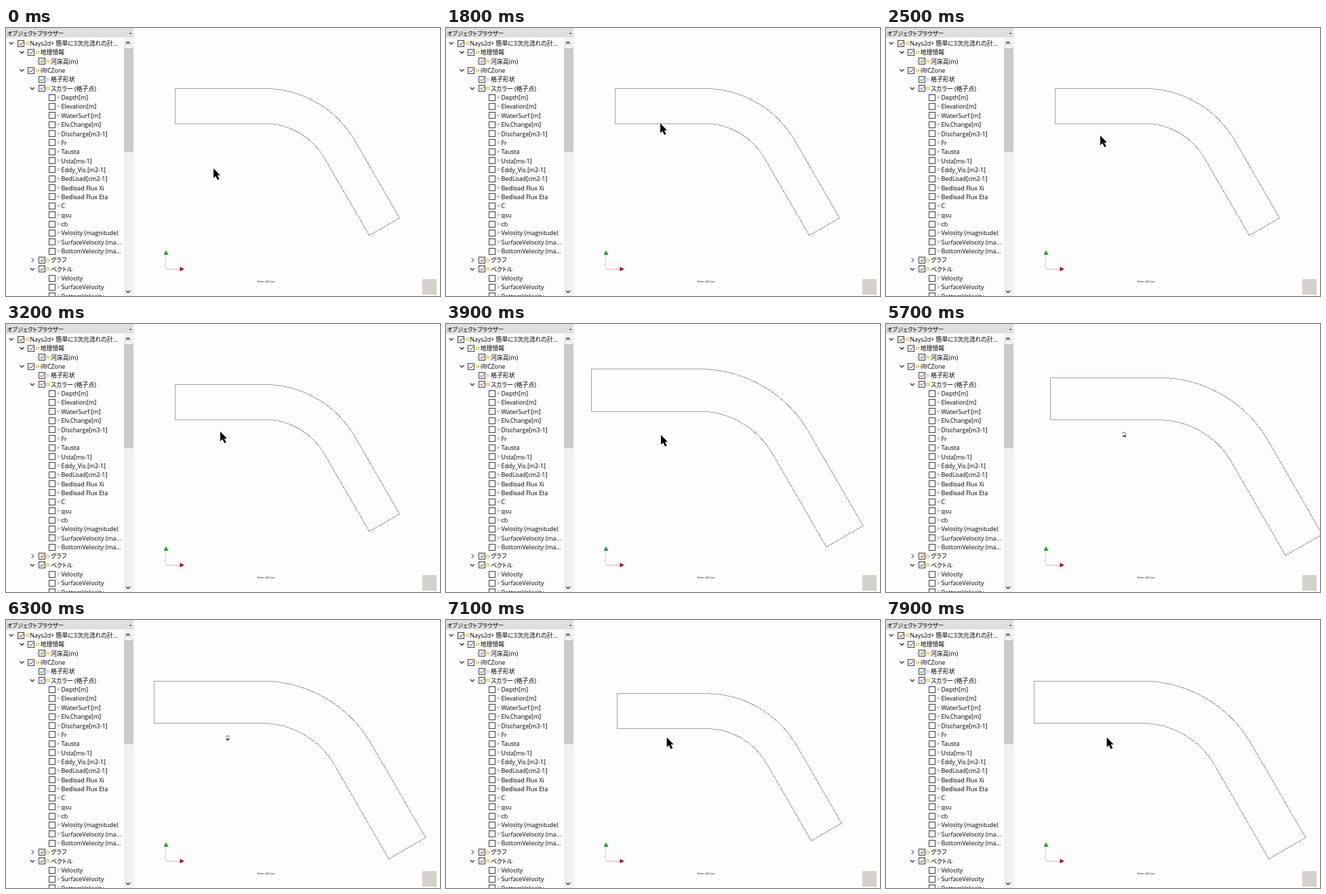
Animation, 640 px wide and 396 px high, one loop 8000 ms. Source, as an HTML page:

```html
<!DOCTYPE html>
<html lang="ja">
<head>
<meta charset="utf-8">
<title>Object browser and view</title>
<style>
  html, body { margin: 0; width: 100%; height: 100%; overflow: hidden; background: #fdfdfe; }
  svg { display: block; width: 640px; height: 396px; }
  text { font: 8.9px "Open Sans", "Noto Sans CJK JP", "Noto Sans CJK", sans-serif; font-feature-settings: "palt"; fill: #000; }
  .line { fill: none; stroke: #404040; stroke-width: 1; }
  .chevron { stroke-width: 1.5; }
</style>
</head>
<body>
<svg viewBox="0 0 640 396">
  <defs><clipPath id="viewport"><rect x="190" width="450" height="396"/></clipPath></defs>
  <rect width="640" height="396" fill="#fdfdfe"/>

  <rect width="188" height="14" fill="#dedede"/>
  <text x="1.5" y="10.6" style="font-size:8.5px">オブジェクトブラウザー</text>
  <rect x="182.5" y="7" width="2" height="2" fill="#404040"/>
  <g id="tree"></g>
  <rect x="174" y="15" width="14" height="381" fill="#f0f0f0"/>
  <rect x="174" y="30" width="14" height="153" fill="#cacaca"/>
  <path class="line chevron" d="M177 23.5l3-3 3 3M177 388l3 3 3-3"/>
  <path d="M189.5 0V396" stroke="#f0f0ea" fill="none"/>

  <g clip-path="url(#viewport)"><path id="channel" fill="none" stroke="#a3a3a0" shape-rendering="crispEdges"/></g>

  <path d="M235.5 356V335" stroke="#a4f0a0"/>
  <path d="M236 356.5H257" stroke="#ffa6b8"/>
  <path d="M236 328.5l3.3 6.5h-6.6z" fill="#08a808"/>
  <path d="M263 356.3l-6.5 3.3v-6.6z" fill="#b80024"/>
  <text x="370" y="376" style="font-size:4.2px">Time: 325 sec</text>
  <rect x="614" y="371" width="21" height="23" fill="#d2d2ca"/>

  <path id="arrow" d="M0 0V14.2L3.2 11.3 6 17 8.6 15.8 5.8 10.2H10z" fill="#000"/>
  <g id="grab">
    <path d="M-2-.5V-2.5Q0-4 2-2.5V1" fill="none" stroke="#70708c"/>
    <path d="M-2 2.5H2.5" stroke="#18185c" stroke-width="2"/>
  </g>
</svg>
<script>
const $ = id => document.getElementById(id);
const LOOP = 8000, STEP = 100;
const CENTER = { x: 415.5, y: 198 };

// Tree rows: indent level, label, kind ("v" open, ">" closed, "f" folder, "l" checked leaf, "" leaf)
const rows = [
  [0, "Nays2d+ 簡単に3次元流れの計...", "v"], [1, "地理情報", "v"], [2, "河床高(m)", "f"],
  [1, "iRICZone", "v"], [2, "格子形状", "l"], [2, "スカラー (格子点)", "v"],
  ...["Depth[m]", "Elevation[m]", "WaterSurf.[m]", "Elv.Change[m]", "Discharge[m3-1]", "Fr",
    "Tausta", "Usta[ms-1]", "Eddy_Vis.[m2-1]", "BedLoad[cm2-1]", "Bedload Flux Xi",
    "Bedload Flux Eta", "C", "qsu", "cb", "Velocity (magnitude)", "SurfaceVelocity (ma...",
    "BottomVelocity (ma..."].map(label => [3, label, ""]),
  [2, "グラフ", ">"], [2, "ベクトル", "v"],
  ...["Velocity", "SurfaceVelocity", "BottomVelocity"].map(label => [3, label, ""])
];

function rowMarkup([level, label, kind], i) {
  const x = 17 + 15.4 * level, y = 22.5 + 13.35 * i;
  const boxX = Math.round(x) + .5, boxY = Math.round(y - 5) + .5;
  const chevron = { v: `M${x - 12} ${y - 1.5}l3 3 3-3`, ">": `M${x - 10} ${y - 3}l3 3-3 3` }[kind];
  const leaf = kind === "" || kind === "l";
  return `<rect class="line" x="${boxX}" y="${boxY}" width="9" height="9"/>` +
    (kind ? `<path class="line" d="M${boxX + 2} ${boxY + 4.5}l2 2.2 3.8-4.5"/>` : "") +
    (chevron ? `<path class="line chevron" d="${chevron}" ${kind === "v" ? "" : 'style="stroke:#888"'}/>` : "") +
    (leaf
      ? `<rect x="${x + 12.8}" y="${y - 1.5}" width="2.6" height="2.6" fill="#fff" stroke="#b0b0c4" stroke-width=".8"/>`
      : `<rect x="${x + 11.8}" y="${y - 1.5}" width="4.4" height="3" fill="#fff3c4" stroke="#e0b040" stroke-width=".9"/>`) +
    `<text x="${x + 18.3}" y="${y + 3.5}">${label}</text>`;
}
$("tree").innerHTML = rows.map(rowMarkup).join("");

// Keys are [time, ...values]
function lerpKeys(keys, t) {
  const next = keys.findIndex(k => k[0] > t);
  if (next < 0) return keys[keys.length - 1].slice(1);
  if (next === 0) return keys[0].slice(1);
  const a = keys[next - 1], b = keys[next], p = (t - a[0]) / (b[0] - a[0]);
  return a.slice(1).map((v, i) => v + (b[i + 1] - v) * p);
}
const holdKey = (keys, t) => keys.filter(k => k[0] <= t).pop()[1];

const pointer = [[0, 306, 207.5], [500, 317, 196], [900, 332, 168], [1200, 317, 136], [1500, 317, 136],
  [1800, 316, 141], [2300, 316, 159], [3200, 316, 159], [3900, 317, 164], [4100, 317, 164], [4400, 322, 150]];
const pan = [[5300, 0, 0], [5600, 20, 4], [5900, 45, 30], [6000, 38, 38], [6200, 26, 26], [6300, 3.6, 23.5]];
// Each wheel notch scales the view by 1.1 squared
const notches = [[0, 0], [1900, -1], [2300, 0], [2700, 1], [3200, 0], [3500, -1], [3700, 0], [3800, 1],
  [6900, 0], [7400, -1], [7800, 0], [7900, 1]];

// Straight reach, 60 degree bend, straight reach
function channelPath(scale, dx, dy) {
  const sin = Math.sqrt(3) / 2, left = 249.4, bend = 380.9, top = 89.4;
  const leg = 132, outer = 154.2, inner = 102.5;
  const view = (x, y) => [CENTER.x + (x - CENTER.x) * scale + dx, CENTER.y + (y - CENTER.y) * scale + dy]
    .map(v => v.toFixed(2)).join(" ");
  const side = r => {
    const edge = top + outer - r, x = bend + r * sin, y = edge + r / 2;
    return [view(left, edge), view(bend, edge), view(x, y), view(x + leg / 2, y + leg * sin)];
  };
  const arc = (r, sweep) => `A${r * scale} ${r * scale} 0 0 ${sweep} `;
  const o = side(outer), n = side(inner);
  return `M${o[0]}L${o[1]}${arc(outer, 1)}${o[2]}L${o[3]}L${n[3]}L${n[2]}${arc(inner, 0)}${n[1]}L${n[0]}Z`;
}

function render(time) {
  const t = Math.floor(time % LOOP / STEP) * STEP;
  const [dx, dy] = lerpKeys(pan, t), [px, py] = lerpKeys(pointer, t);
  const notch = holdKey(notches, t), scale = 1.21 ** notch;
  const shift = 1.21 ** (notch - 1);
  $("channel").setAttribute("d", channelPath(scale, dx * shift, dy * shift));
  const grabbing = t >= 5200 && t < 6700;
  $("arrow").setAttribute("visibility", grabbing ? "hidden" : "visible");
  $("grab").setAttribute("visibility", grabbing ? "visible" : "hidden");
  $("arrow").setAttribute("transform", `translate(${px + dx} ${py + dy})`);
  $("grab").setAttribute("transform", `translate(${px + dx + 1} ${py + dy + .5})`);
}

const start = performance.now();
function tick() {
  render(performance.now() - start);
  requestAnimationFrame(tick);
}
tick();
</script>
</body>
</html>
```
